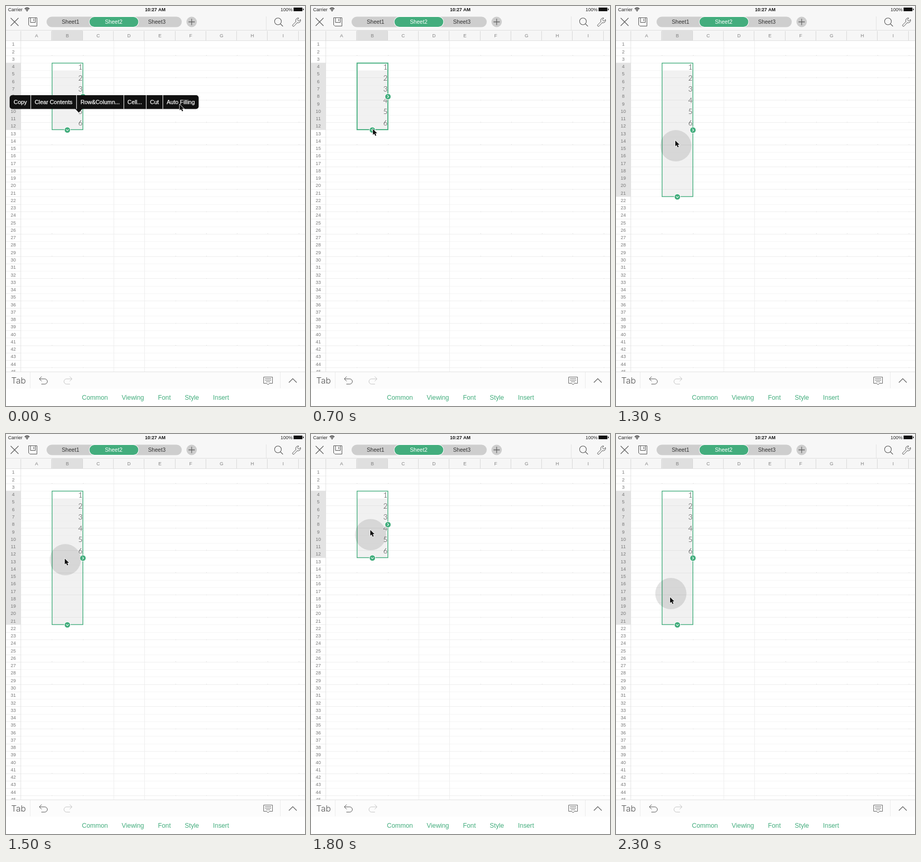
Recreate the animation shown at these times as an HTML page with a canvas. Size 575 px wide and 767 px high, loop 2.4 s.

```html
<!DOCTYPE html>
<html lang="en">
<head>
<meta charset="utf-8">
<title>Spreadsheet selection</title>
<style>
  html, body { margin: 0; width: 100%; height: 100%; overflow: hidden; background: #fff; }
  canvas { display: block; }
</style>
</head>
<body>
<canvas id="stage" width="575" height="767"></canvas>
<script>
const ctx = document.getElementById('stage').getContext('2d');
const GREEN = '#43ad7d', SANS = '"Liberation Sans", Arial, sans-serif';
const LOOP = 2400, STEP = 100;
const rowTop = n => 66 + 14.26 * (n - 1);
const colLeft = n => 29 + 59.3 * n;

// Pointer keys: time, x, y of the tip
const POINTER = [
  [0, 334, 189], [100, 298, 186], [200, 205, 172], [300, 130, 164], [400, 124, 186],
  [500, 121, 216], [600, 121, 234], [700, 119, 236], [900, 118, 241], [1000, 116, 269],
  [1100, 115, 283], [1200, 115, 278], [1300, 114, 258], [1400, 114, 243], [1500, 113, 239],
  [1700, 114, 202], [1800, 114, 184], [2000, 115, 165], [2100, 115, 165], [2200, 106, 299],
  [2300, 104, 313]
];

function pointerAt(t) {
  const i = POINTER.findIndex(k => k[0] >= t), b = POINTER[i], a = POINTER[Math.max(i - 1, 0)];
  const f = b === a ? 0 : (t - a[0]) / (b[0] - a[0]);
  return [a[1] + (b[1] - a[1]) * f, a[2] + (b[2] - a[2]) * f];
}

const lastRow = t => (t >= 1000 && t < 1700) || t >= 2200 ? 21 : 12;

function rect(x, y, w, h, color) {
  ctx.fillStyle = color;
  ctx.fillRect(x, y, w, h);
}

function pill(x, y, w, h, r, color) {
  ctx.beginPath();
  ctx.roundRect(x, y, w, h, r);
  ctx.fillStyle = color;
  ctx.fill();
}

function disc(x, y, r, color) {
  ctx.beginPath();
  ctx.arc(x, y, r, 0, 7);
  ctx.fillStyle = color;
  ctx.fill();
}

function stroke(path, color, width = 1) {
  ctx.strokeStyle = color;
  ctx.lineWidth = width;
  ctx.stroke(new Path2D(path));
}

function text(str, x, y, size, color, align = 'center', font = SANS, weight = 400) {
  ctx.font = `${weight} ${size}px ${font}`;
  ctx.textAlign = align;
  ctx.textBaseline = 'alphabetic';
  ctx.fillStyle = color;
  ctx.fillText(str, x, y + size * 0.36);
}

function drawGrid(last) {
  rect(0, 0, 575, 767, '#fff');
  for (let n = 2; n <= 45; n++) {
    const y = Math.round(rowTop(n));
    rect(29, y, 546, 1, n % 3 === 0 ? '#eeeeee' : '#f5f5f5');
    rect(0, y, 28, 1, '#ececec');
  }
  for (let c = 1; c <= 9; c++) {
    const x = Math.round(colLeft(c));
    if (c === 3 || c === 4) rect(x, 66, 1, 636, '#ededed');
    else for (let y = 94; y < 700; y += 42.8) rect(x, Math.round(y), 1, 1, '#d8d8d8');
  }

  rect(0, rowTop(4), 28, rowTop(last + 1) - rowTop(4), '#e3e3e3');
  rect(28, 66, 1, 636, '#e2e2e2');
  for (let n = 1; n <= 45; n++) text(n, 14, rowTop(n) + 7.2, 9, '#777');

  rect(0, 47, 575, 19, '#f6f6f6');
  rect(colLeft(1), 47, 59, 19, '#dfdfdf');
  for (let c = 0; c < 10; c++) {
    rect(Math.round(colLeft(c)) - 1, 48, 1, 18, '#d8d8d8');
    if (c < 9) text('ABCDEFGHI'[c], colLeft(c) + 29.7, 56.5, 9, '#808080');
  }
  rect(0, 66, 575, 1, '#e0e0e0');
}

function drawTopBar() {
  rect(0, 0, 575, 47, '#f7f7f7');
  rect(0, 46, 575, 1, '#dedede');
  text('Carrier', 4, 7, 9.1, '#222', 'left');
  text('10:27 AM', 287, 7, 9, '#111', 'center', SANS, 700);
  text('100%', 551, 7, 9, '#222', 'right');
  rect(553, 3, 17, 7, '#111');
  rect(571, 5, 1.5, 3, '#111');
  stroke('M36 5.5Q40.5 1.5 45 5.5M37.7 7.4Q40.5 5 43.3 7.4', '#222', 1.3);
  disc(40.5, 9, 1.2, '#222');

  stroke('M9 23L24 38M24 23L9 38', '#555', 1.1);
  stroke('M43.5 22.5H59.5V38.5H46L43.5 36ZM47 22.5V31.5H56.5V22.5M53.5 24.5V29', '#555');
  pill(78, 20.5, 260, 20, 10, '#cecece');
  pill(159.5, 20, 96, 21, 10.5, '#fff');
  pill(160.5, 21, 94, 19, 9.5, GREEN);
  text('Sheet1', 124, 30.5, 10.6, '#333');
  text('Sheet2', 207, 30.5, 10.6, '#fff');
  text('Sheet3', 290, 30.5, 10.6, '#333');
  disc(357, 30.5, 10, '#cdcdcd');
  stroke('M351 30.5H363M357 24.5V36.5', '#666', 1.3);
  rect(500, 20, 1, 26, '#e4e4e4');
  stroke('M529.5 29.5a6.5 6.5 0 1 1-13 0a6.5 6.5 0 1 1 13 0M527.7 34.2L532.5 39', '#555', 1.1);
  stroke('M563 23a5 5 0 0 0-5.5 7L551.5 36a1.7 1.7 0 0 0 2.5 2.5L560 32a5 5 0 0 0 6.5-6L563 29L560.5 26.5Z', '#555');
}

function drawBottomBar() {
  rect(0, 701, 575, 66, '#fff');
  rect(0, 701, 575, 33, '#fcfcfc');
  rect(0, 701, 575, 1, '#e2e2e2');
  rect(46, 702, 1, 31, '#ececec');
  rect(527, 702, 1, 31, '#ececec');
  text('Tab', 10, 718.5, 16.5, '#555', 'left', 'Inter, sans-serif', 300);
  const arrow = 'M68.5 710.5L64 715L68.5 719.5M64 715H74.5a5 5 0 0 1 0 10H68';
  stroke(arrow, '#555');
  ctx.save();
  ctx.translate(191, 0);
  ctx.scale(-1, 1);
  stroke(arrow, '#c4c4c4');
  ctx.restore();
  stroke('M495.5 711.5H512.5V723.5H507L504 726L501 723.5H495.5Z', '#666');
  stroke('M498 714.5H510M498 717.5H510M500 720.5H508', '#777', 1);
  stroke('M544 722L551.5 714.5L559 722', '#555', 1.1);
  [['Common', 171], ['Viewing', 244], ['Font', 304.5], ['Style', 357.5], ['Insert', 413.5]]
    .forEach(([label, x]) => text(label, x, 750.5, 12.3, GREEN));
}

function drawHandle(x, y, turned) {
  disc(x, y, 6.3, '#fff');
  disc(x, y, 5.3, GREEN);
  stroke(turned ? `M${x - 1.2} ${y - 2.5}l2.5 2.5l-2.5 2.5` : `M${x - 2.5} ${y - 1.2}l2.5 2.5l2.5 -2.5`, '#fff', 1.1);
}

function drawSelection(t) {
  const top = 109.5, bottom = rowTop(lastRow(t) + 1);
  const before = rowTop(lastRow(Math.max(t - STEP, 0)) + 1);
  rect(89, top, 59, bottom - top, '#f1f1f1');
  rect(89, top, 59, 14, '#fff');
  for (let n = 6; n <= lastRow(t); n++) rect(90, Math.round(rowTop(n)), 57, 1, n % 3 ? '#eeeeee' : '#e4e4e4');
  for (let i = 0; i < 6; i++) text(i + 1, 147, 116.5 + 21.4 * i, 14, '#333', 'right', 'Lato, sans-serif', 300);
  ctx.strokeStyle = GREEN;
  ctx.lineWidth = t >= 200 && t < 900 ? 1.9 : 1.4;
  ctx.strokeRect(88.6, top, 59.2, bottom - top);
  drawHandle(118, bottom + 0.6);
  // The side handle settles one step after the resize
  drawHandle(148, (2 * top + bottom + before) / 4 + 0.4, true);
}

function drawMenu() {
  pill(7, 171, 363.5, 26.5, 5, '#111');
  ctx.fill(new Path2D('M133 197H147L140 204.5Z'));
  [47, 135, 226, 269, 301].forEach(x => rect(x, 171, 1.2, 26.5, '#ddd'));
  [['Copy', 27.5], ['Clear Contents', 91.5], ['Row&Column...', 181], ['Cell...', 247.5], ['Cut', 285.5], ['Auto Filling', 336]]
    .forEach(([label, x]) => {
      text(label, x, 184.5, 10.9, '#fff');
      ctx.strokeStyle = '#fff';
      ctx.lineWidth = 0.25;
      ctx.strokeText(label, x, 184.5 + 10.9 * 0.36);
    });
}

function drawPointer(t) {
  const [x, y] = pointerAt(t);
  if (t >= 900) {
    const [px, py] = pointerAt(t - STEP);
    disc((x + px) / 2 + 0.5, (y + py) / 2, 30, 'rgba(0,0,0,.11)');
  }
  ctx.save();
  ctx.translate(x, y);
  const shape = new Path2D('M0 0V11L2.6 8.7L4.6 13L6.6 12.1L4.7 8H8.2Z');
  ctx.strokeStyle = '#fff';
  ctx.lineWidth = 1.4;
  ctx.stroke(shape);
  ctx.fillStyle = '#111';
  ctx.fill(shape);
  ctx.restore();
}

function frame() {
  const t = Math.floor(performance.now() % LOOP / STEP) * STEP;
  drawGrid(lastRow(t));
  drawSelection(t);
  drawTopBar();
  drawBottomBar();
  if (t < 200) drawMenu();
  drawPointer(t);
  requestAnimationFrame(frame);
}
frame();
</script>
</body>
</html>
```
